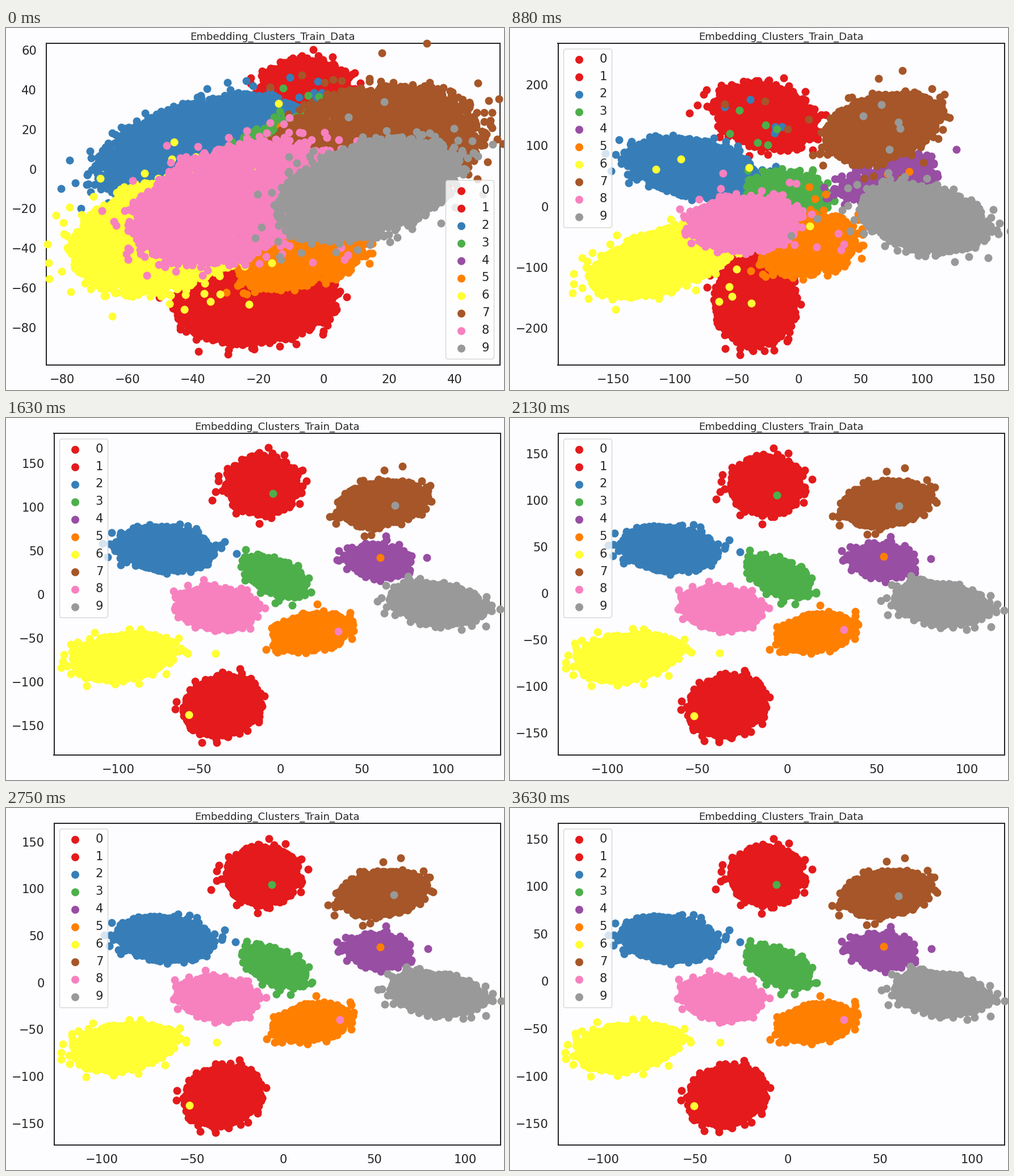
A matplotlib script for the animation above (3.76 s loop, 877 px wide and 638 px high).

```python
import numpy as np
import matplotlib.pyplot as plt
from matplotlib.animation import FuncAnimation
from matplotlib.patches import FancyBboxPatch

W, H, DPI = 877, 638, 100
TICK, FRAMES = 40, 94            # ms per drawn frame, frames per loop
EPOCH, EPOCHS = 125, 30          # the picture moves on once per epoch
SPREAD, SETTLED = 7, 13          # epochs at which the clouds reach each pose
PT = 72 / DPI
BG, INK = "#fdfdff", "#262626"
TOP, BOTTOM = 27, 593.5
DOT = 14 * PT
DENSITY = 0.035
GUESTS = 10

# colour, then ellipses (x, y, rx, ry, tilt): start, spread out, settled
CLOUDS = [
    ("#e41a1c", (528, 105, 78, 52, 0), (450, 155, 92, 58, 15), (452, 118, 63, 52, 0)),
    ("#e41a1c", (440, 484, 140, 74, -5), (432, 482, 70, 80, 0), (381, 508, 67, 50, -15)),
    ("#377eb8", (335, 207, 188, 76, -17), (320, 246, 115, 48, 10), (280, 230, 82, 37, 5)),
    ("#4daf4a", (440, 212, 110, 30, -28), (492, 292, 66, 42, 10), (475, 279, 56, 30, 25)),
    ("#984ea3", (580, 270, 70, 45, 0), (665, 265, 85, 35, -15), (657, 252, 55, 27, 5)),
    ("#ff7f00", (520, 412, 115, 42, -12), (525, 383, 88, 52, -8), (537, 378, 68, 31, -8)),
    ("#ffff33", (290, 360, 180, 98, -18), (272, 408, 135, 52, -18), (204, 421, 85, 38, -8)),
    ("#a65628", (658, 205, 180, 102, -8), (655, 175, 100, 54, -15), (662, 150, 73, 36, -8)),
    ("#f781bf", (398, 308, 185, 97, -18), (410, 345, 92, 45, 0), (370, 335, 65, 34, 8)),
    ("#999999", (638, 285, 165, 82, -17), (728, 335, 110, 56, 12), (758, 327, 80, 34, 8)),
]
COLORS = [c[0] for c in CLOUDS]
POSES = np.array([c[1:] for c in CLOUDS], float)

# axis origin and pixels per unit over the epochs
VIEW_AT = [0, 3, 7, 10, 17, 29]
X0, SX = [559.7, 501, 508.5, 480, 488, 489], [5.758, 3.48, 2.177, 2.632, 3.165, 3.253]
Y0, SY = [248.6, 309.5, 314.7, 312.5, 309, 305.5], [3.493, 1.75, 1.0725, 1.463, 1.64, 1.672]

plt.rcParams["font.family"] = "DejaVu Sans"
rng = np.random.default_rng(5)


def place(c, unit):
    """Put unit-disc points into the three ellipses of cloud c."""
    x, y, rx, ry, tilt = POSES[c].T[..., None]
    u, v = rx * unit[:, 0], ry * unit[:, 1]
    cos, sin = np.cos(np.radians(tilt)), np.sin(np.radians(tilt))
    return np.stack([x + u * cos - v * sin, y + u * sin + v * cos], axis=-1)


def polar(r, turn):
    return np.stack([r * np.cos(2 * np.pi * turn), r * np.sin(2 * np.pi * turn)], axis=-1)


def cloud(c):
    """Dense core, ragged rim, and guests that sit in a neighbour until they settle."""
    area = np.pi * (POSES[c, :, 2] * POSES[c, :, 3]).max()
    i = np.arange(int(area * DENSITY))
    core = np.sqrt(i * 0.56984 % 1) * rng.normal(0.98, 0.05, i.size)
    tail = 50 + i.size // 30
    rim = 0.95 + rng.exponential(0.12, tail)
    unit = np.concatenate([polar(core, i * 0.754878 % 1), polar(rim, rng.random(tail))])

    gap = np.hypot(*(POSES[:, 2, :2] - POSES[c, 2, :2]).T)
    near = np.argsort(gap)[1:4]
    spots = polar(np.sqrt(rng.random(GUESTS)), rng.random(GUESTS))
    guests = place(c, spots)
    for g, host in enumerate(rng.choice(near, GUESTS)):
        away = place(host, spots[g:g + 1])[:, 0]
        stay = 3 if g == 0 else 2
        guests[:stay, g] = away[:stay]
    return np.concatenate([place(c, unit), guests], axis=1)


tracks = [cloud(c) for c in range(len(CLOUDS))]
phases = [rng.uniform(0, 2 * np.pi, t.shape[1:]) for t in tracks]


def positions(track, phase, epoch):
    if epoch < SPREAD:
        a, b = track[:2]
        w = 1 - (1 - epoch / SPREAD) ** 2
    else:
        a, b = track[1:]
        w = 1 - (1 - min((epoch - SPREAD) / (SETTLED - SPREAD), 1)) ** 3
    return a + (b - a) * w + 1.5 * np.sin(epoch + phase)


fig = plt.figure(figsize=(W / DPI, H / DPI), dpi=DPI, facecolor=BG)
ax = fig.add_axes([0.1, 0.1, 0.8, 0.8], facecolor=BG)
ax.tick_params(length=0, pad=17 * PT, labelsize=21 * PT, labelcolor=INK)
for spine in ax.spines.values():
    spine.set(linewidth=2 * PT, edgecolor=INK)
stage = fig.add_axes([0, 0, 1, 1], zorder=1)
stage.set(xlim=(0, W), ylim=(H, 0))
stage.axis("off")
title = stage.text(0, 21, "Embedding_Clusters_Train_Data", ha="center",
                   fontsize=18.1 * PT, color=INK)
dots = [stage.plot([], [], "o", ms=DOT, mew=0, color=col, zorder=2 + c)[0]
        for c, col in enumerate(COLORS)]


def legend(x, y):
    rows = y + 19 + 30.83 * np.arange(len(COLORS))
    box = FancyBboxPatch((x + 4, y + 4), 77, 307, boxstyle="round,pad=4,rounding_size=4",
                         fc="white", ec="#cccccc", lw=1, alpha=0.8, zorder=20)
    stage.add_patch(box)
    marks = stage.scatter(np.full(rows.size, x + 27.5), rows, s=DOT ** 2, c=COLORS,
                          linewidths=0, zorder=21)
    names = [stage.text(x + 70, row - 1.2, str(n), ha="center", va="center",
                        fontsize=21 * PT, color=INK, zorder=21)
             for n, row in enumerate(rows)]
    return [box, marks, *names]


low_right, up_left = legend(774.5, 268.5), legend(94.5, 37)


def ticks(lo, hi):
    span = hi - lo
    step = 20 if span < 180 else 50 if span < 400 else 100
    return np.arange(np.ceil(lo / step), np.floor(hi / step) + 1) * step


def update(frame):
    epoch = min(int((frame * TICK + 30) / EPOCH), EPOCHS - 1)
    x0, sx, y0, sy = (np.interp(epoch, VIEW_AT, v) for v in (X0, SX, Y0, SY))
    early = epoch < 2
    left, right = (71, 870) if early else (84.5, 870.5)
    ax.set_position([left / W, 1 - BOTTOM / H, (right - left) / W, (BOTTOM - TOP) / H])
    xlim = (left - x0) / sx, (right - x0) / sx
    ylim = (y0 - BOTTOM) / sy, (y0 - TOP) / sy
    ax.set_xticks(ticks(*xlim))
    ax.set_yticks(ticks(*ylim))
    ax.set(xlim=xlim, ylim=ylim)
    title.set_x((left + right) / 2 - 0.5)
    for line, track, phase in zip(dots, tracks, phases):
        line.set_data(*positions(track, phase, epoch).T)
    for art in low_right:
        art.set_visible(early)
    for art in up_left:
        art.set_visible(not early)
    return dots


anim = FuncAnimation(fig, update, frames=FRAMES, interval=TICK,
                     repeat=True, repeat_delay=0, blit=False)
plt.show()
```
